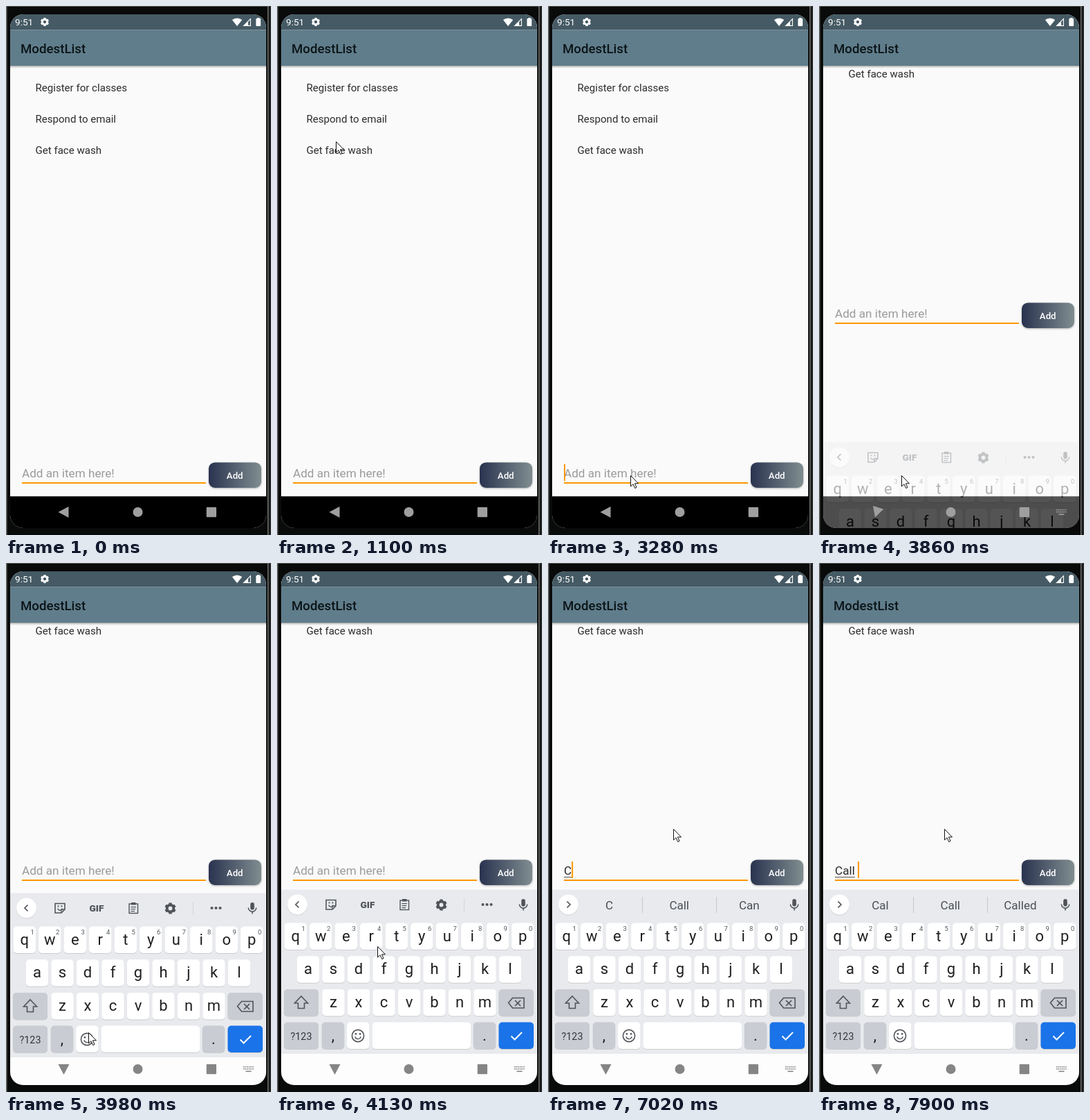
An HTML page with a canvas that plays this animation: 383 px wide and 762 px high, repeating every 8 s.

```html
<!DOCTYPE html>
<html lang="en">
<head>
<meta charset="utf-8">
<title>To-do list</title>
<style>
html, body { margin: 0; width: 100%; height: 100%; overflow: hidden; background: #0a0a0a; }
canvas { display: block; width: 383px; height: 762px; }
</style>
</head>
<body>
<canvas id="stage"></canvas>
<script>
const W = 383, H = 762, LOOP = 8000;
const OPEN = 3860, TYPE = 6870, TICK = 131;
const PITCH = 36.5;
const ICON = '#505458', PAPER = '#fafafa', ORANGE = '#ff9800', INK = '#1f1f1f', GREY = '#c9ccd3';

const dpr = window.devicePixelRatio || 1;
const stage = document.getElementById('stage');
const layer = document.createElement('canvas');
for (const c of [stage, layer]) {
  c.width = W * dpr;
  c.height = H * dpr;
}
const screen2d = stage.getContext('2d'), layer2d = layer.getContext('2d');
let g = screen2d;

// --- timing rules ---

const out = n => p => 1 - (1 - p) ** n;
const smooth = p => p * p * (3 - 2 * p);

// pointer journeys: start, end, from, to, easing in x and y
const trips = [
  { t0: 590, t1: 1670, a: [36, 423], b: [118, 116], ease: [out(2), out(3)] },
  { t0: 1670, t1: 2160, a: [118, 116], b: [118, 610], ease: [smooth, smooth] },
  { t0: 2170, t1: 2690, a: [118, 610], b: [119, 676], ease: [out(4), out(4)] },
  { t0: 4000, t1: 4990, a: [119, 676], b: [181, 383], ease: [out(4), out(4)] }
];

function pointerAt(t) {
  const s = 590 + Math.floor((t - 590) / TICK) * TICK;
  const trip = trips.filter(k => k.t0 <= s).pop();
  if (!trip) return null;
  const p = Math.min(1, (s - trip.t0) / (trip.t1 - trip.t0));
  return trip.a.map((v, i) => Math.round(v + (trip.b[i] - v) * trip.ease[i](p)));
}

const caretOn = t => t >= TYPE || (t >= 295 && (t - 295) % 968 < 515);

function wordAt(t) {
  const n = t < TYPE ? 0 : t < 7300 ? 1 : 2 + Math.floor((t - 7300) / 200);
  return 'Call '.slice(0, n);
}

// suggestions trail the typing a little
function hintsAt(t) {
  const stem = wordAt(t - 150).slice(0, 3);
  return stem && [stem, 'Call', stem.length < 3 ? 'Can' : 'Called'];
}

// --- drawing helpers ---

function rect(x, y, w, h, color) {
  g.fillStyle = color;
  g.fillRect(x, y, w, h);
}

function roundPath(x, y, w, h, r) {
  g.beginPath();
  g.moveTo(x + r, y);
  g.arcTo(x + w, y, x + w, y + h, r);
  g.arcTo(x + w, y + h, x, y + h, r);
  g.arcTo(x, y + h, x, y, r);
  g.arcTo(x, y, x + w, y, r);
  g.closePath();
}

function box(x, y, w, h, r, color) {
  roundPath(x, y, w, h, r);
  g.fillStyle = color;
  g.fill();
}

function disc(x, y, r, color) {
  g.beginPath();
  g.arc(x, y, r, 0, Math.PI * 2);
  g.fillStyle = color;
  g.fill();
}

function ring(x, y, r, color, width, from = 0, to = Math.PI * 2) {
  g.beginPath();
  g.arc(x, y, r, from, to);
  g.strokeStyle = color;
  g.lineWidth = width;
  g.stroke();
}

function poly(points, color) {
  g.beginPath();
  points.forEach(p => g.lineTo(...p));
  g.closePath();
  g.fillStyle = color;
  g.fill();
}

function line(points, color, width, close) {
  g.beginPath();
  points.forEach(p => g.lineTo(...p));
  if (close) g.closePath();
  g.strokeStyle = color;
  g.lineWidth = width;
  g.stroke();
}

function text(str, x, y, size, color, align = 'left', weight = 400) {
  g.font = `${weight} ${size}px Roboto, sans-serif`;
  g.textAlign = align;
  g.fillStyle = color;
  g.fillText(str, x, y);
}

function blend(x0, y0, x1, y1, from, to) {
  const fade = g.createLinearGradient(x0, y0, x1, y1);
  fade.addColorStop(0, from);
  fade.addColorStop(1, to);
  return fade;
}

function at(x, y, turn, paint) {
  g.save();
  g.translate(x, y);
  g.rotate(turn);
  paint();
  g.restore();
}

function gear(x, y, r, color) {
  ring(x, y, r * 0.6, color, r * 0.48);
  for (let i = 0; i < 6; i++) {
    at(x, y, (i + 0.5) * Math.PI / 3, () => rect(r * 0.7, -r * 0.27, r * 0.3, r * 0.54, color));
  }
}

// --- app ---

function frame() {
  rect(0, 0, W, H, '#090a0a');
  rect(0, 0, W, 1, '#555');
  rect(0, 0, 1.5, H, '#6a6a6a');
  rect(378, 0, 1.5, H, '#777');
  rect(381, 0, 2, H, '#2a2a2a');
}

function bars() {
  rect(6, 12, 370, 22.5, '#455a64');
  rect(6, 34.5, 370, 51.7, '#607d8b');
  rect(6, 86, 370, 4, blend(0, 86, 0, 90, 'rgba(0,0,0,.25)', 'rgba(0,0,0,0)'));
  text('ModestList', 21, 68, 18.7, '#0b1518', 'left', 500);

  text('9:51', 13, 28, 13.6, '#fff');
  gear(56, 23, 6, '#fff');
  g.beginPath();
  g.moveTo(334, 29);
  g.arc(334, 29, 11.6, -2.24, -0.9);
  g.fillStyle = '#fff';
  g.fill();
  line([[343.5, 28.4], [353.4, 28.4], [353.4, 18.5]], '#fff', 1.1, true);
  poly([[343, 28.8], [350, 28.8], [350, 21.8]], '#fff');
  rect(363, 17, 3.5, 2, '#fff');
  box(361.3, 18, 6.8, 11, 1, '#fff');
}

function list(lift) {
  g.save();
  g.beginPath();
  g.rect(6, 86, 370, 560);
  g.clip();
  ['Register for classes', 'Respond to email', 'Get face wash'].forEach((s, i) =>
    text(s, 42.5, 123 + i * 45.2 - lift, 15.07, '#2c2c2c'));
  g.restore();
}

function entry(t) {
  const word = wordAt(t);
  rect(23, 686, 266, 2, ORANGE);
  text(word || 'Add an item here!', 23, 679, 17.15, word ? '#2c2c2c' : '#9b9b9b');
  if (word) rect(23, 682, g.measureText(word.trim()).width, 1, '#555');
  if (caretOn(t)) rect(23 + (word && g.measureText(word).width), 660, 2, 24, ORANGE);

  g.save();
  g.shadowColor = 'rgba(0,0,0,.3)';
  g.shadowBlur = 3 * dpr;
  g.shadowOffsetY = dpr;
  box(293, 657.4, 76, 36.6, 9, blend(293, 0, 369, 0, '#29334f', '#808d90'));
  g.restore();
  text('Add', 330.7, 681, 13.2, '#fff', 'center', 500);
}

// --- keyboard ---

function key(x, y, w, color) {
  box(x, y + 1, w, 38.5, 5, 'rgba(0,0,0,.13)');
  box(x, y, w, 38.5, 5, color);
}

function charKey(c, x, y, color = '#fff') {
  key(x - 16.2, y, 32.4, color);
  text(c, x, y + 26, 22, INK, 'center');
}

function letterRows() {
  ['qwertyuiop', 'asdfghjkl', 'zxcvbnm'].forEach((row, r) => {
    const first = 191 - (row.length - 1) * PITCH / 2;
    [...row].forEach((c, i) => {
      const x = first + i * PITCH;
      charKey(c, x, 518.5 + r * 47.7);
      if (!r) text((i + 1) % 10, x + 11.5, 530, 9.5, '#55595e', 'center');
    });
  });
}

function mic(x, y) {
  box(x - 2.8, y - 8, 5.6, 10.5, 2.8, ICON);
  ring(x, y - 0.5, 5.7, ICON, 1.5, 0, Math.PI);
  rect(x - 0.8, y + 5, 1.6, 3.5, ICON);
}

function face(x, y, size) {
  [-1, 1].forEach(s => disc(x + s * size * 0.7, y - size * 0.6, size * 0.3, ICON));
  ring(x, y + 0.2, size, ICON, 1.4, 0.25, Math.PI - 0.25);
}

function tools() {
  line([[71, 485.5], [85, 485.5], [85, 494], [80, 499], [71, 499]], ICON, 1.6, true);
  line([[85, 494], [80, 494], [80, 499]], ICON, 1.3);
  face(78, 491.5, 3.5);
  text('GIF', 131, 497, 13.6, ICON, 'center', 900);
  g.strokeRect(178, 486, 12.5, 13.5);
  rect(181, 484, 6.5, 3.5, ICON);
  for (let i = 0; i < 3; i++) {
    rect(180.5, 490 + i * 3, 7.5 - i, 1.2, ICON);
    disc(297.5 + i * 6, 492, 2, ICON);
  }
  gear(237.5, 492.5, 8, ICON);
  rect(270, 483, 1, 19, '#d3d6da');
}

function suggestions(words) {
  words.forEach((s, i) => {
    text(s, 88.5 + i * 101.2, 499, 17, '#4b4f54', 'center');
    if (i) rect(29 + i * 107, 481, 1, 23, '#c4c7cb');
  });
}

function keyboard(t) {
  rect(6, 470.5, 370, 237, '#e8eaed');
  rect(6, 707, 370, 60, '#fdfdfd');

  const words = hintsAt(t);
  disc(29.5, 493, 14.6, 'rgba(0,0,0,.1)');
  disc(29.5, 492, 14.4, '#fff');
  at(29.5, 492, words ? 0 : Math.PI, () => line([[-2, -4.5], [2.5, 0], [-2, 4.5]], ICON, 1.7));
  if (words) suggestions(words);
  else tools();
  mic(356, 492);

  letterRows();

  key(10, 614, 50, GREY);
  line([[35, 624], [44.5, 634], [39.5, 634], [39.5, 641.5], [30.5, 641.5], [30.5, 634], [25.5, 634]], ICON, 1.6, true);
  key(320.5, 614, 50.5, GREY);
  line([[334.5, 633.5], [340.5, 626.5], [357, 626.5], [357, 641], [340.5, 641]], ICON, 1.6, true);
  [-1, 1].forEach(s => line([[348 - 4 * s, 630], [348 + 4 * s, 638]], ICON, 1.7));

  key(10, 661.5, 50, GREY);
  text('?123', 35, 687, 14.3, '#33363a', 'center');
  charKey(',', 81, 661.5, GREY);
  charKey('', 117.3, 661.5);
  ring(117, 681, 8.6, ICON, 1.6);
  face(117, 681, 4.4);
  key(137.5, 661.5, 142.5, '#fff');
  charKey('.', 300, 661.5, GREY);
  key(320.5, 661.5, 50.5, '#1a73e8');
  line([[338.5, 681.5], [343.5, 686.5], [354, 676]], '#fff', 2);
}

// slides up while fading in; flattened first so overlaps do not add up
function showKeyboard(t) {
  const n = Math.floor((t - OPEN) / 120);
  g = layer2d;
  g.setTransform(dpr, 0, 0, dpr, 0, 0);
  g.clearRect(0, 0, W, H);
  at(0, Math.round(158 * 0.03 ** n), 0, () => keyboard(t));
  g = screen2d;
  g.globalAlpha = n ? 1 : 0.33;
  g.drawImage(layer, 0, 0, W, H);
  g.globalAlpha = 1;
}

function navigation(t) {
  const turn = Math.min(1, Math.max(0, (t - OPEN + 480) / 600)) * (t >= OPEN);
  const color = turn === 1 ? '#858585' : '#9f9f9f';
  at(83.5, 729, -turn * Math.PI / 2, () => poly([[-8, 0], [7, -8], [7, 8]], color));
  disc(190.5, 729, 7, color);
  box(289.7, 722, 14.3, 14.3, 1, color);
  if (!turn) return;
  for (let i = 0; i < 12; i++) rect(343 + (i % 6) * 2.6, i < 6 ? 725 : 728, 1.6, 1.6, color);
  rect(346.5, 731.5, 8, 1.6, color);
}

function arrow(x, y) {
  at(x, y, 0, () => {
    const shape = [[0.5, 0.5], [0.5, 16], [4, 12.7], [6.7, 18.6], [9, 17.5], [6.5, 11.8], [11.5, 11.8]];
    poly(shape, '#fff');
    line(shape, '#111', 1, true);
  });
}

function draw(t) {
  const open = t >= OPEN;
  g.setTransform(dpr, 0, 0, dpr, 0, 0);
  frame();
  g.save();
  roundPath(6, 12, 370, 740, 19);
  g.clip();
  rect(6, 12, 370, 740, PAPER);
  rect(6, 706.3, 370, 46, '#000');
  bars();
  list(open ? 110 : 0);
  at(0, open ? -230 : 0, 0, () => entry(t));
  if (open) showKeyboard(t);
  navigation(t);
  g.restore();
  const tip = pointerAt(t);
  if (tip) arrow(...tip);
}

const start = performance.now();
function tick() {
  draw((performance.now() - start) % LOOP);
  requestAnimationFrame(tick);
}
tick();
</script>
</body>
</html>
```
